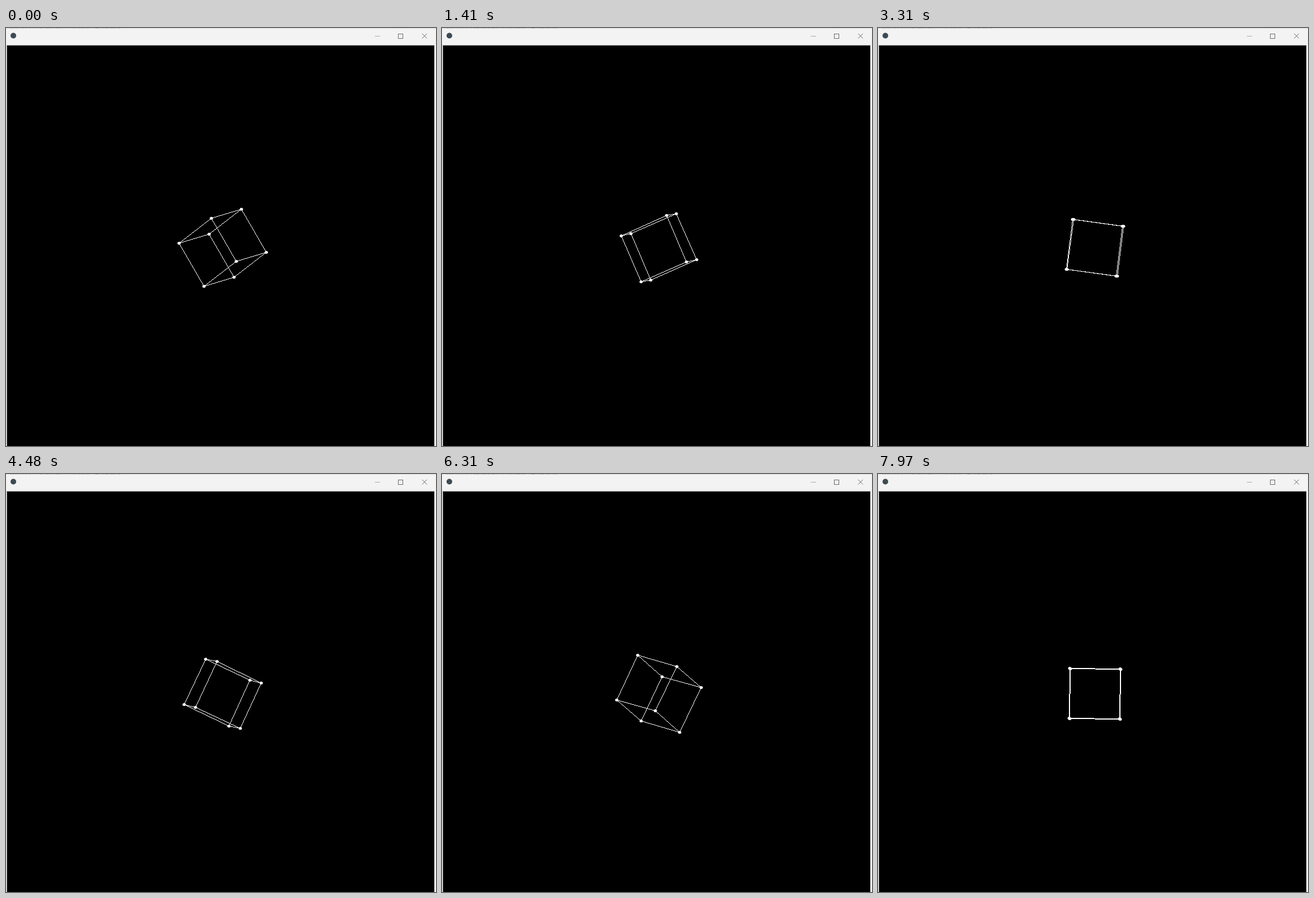
An HTML page with a canvas for the animation above (8000 ms loop, 759 px wide and 737 px high).

```html
<!DOCTYPE html>
<html lang="en">
<head>
<meta charset="utf-8">
<title>Rotating cube</title>
<style>
  html, body { margin: 0; width: 100%; height: 100%; overflow: hidden; background: #000; }
  canvas { display: block; }
</style>
</head>
<body>
<canvas id="stage" width="759" height="737"></canvas>
<script>
const W = 759, H = 737, LOOP = 8000;
const TICK = 68.1, PHASE = 0.52;   // repaint interval in ms, offset of the first repaint
const START = -39.4, SPEED = -0.01754;   // degrees, degrees per ms
const CENTER = { x: 382.3, y: 387 };
const HALF = { x: 44.6, y: 44.4 };
const ctx = document.getElementById('stage').getContext('2d');

// Steady turn with a slight drift in speed, held between repaints
function angleAt(t) {
  const held = Math.floor(t / TICK + PHASE) * TICK;
  const drift = 0.75 * Math.sin((held - 300) / LOOP * Math.PI * 2);
  return (START + SPEED * held + drift) * Math.PI / 180;
}

function rect(color, x, y, w, h) {
  ctx.fillStyle = color;
  ctx.fillRect(x, y, w, h);
}

// One-pixel line without smoothing
function pixelLine(a, b) {
  const dx = b.x - a.x, dy = b.y - a.y;
  const n = Math.max(Math.abs(dx), Math.abs(dy));
  for (let i = 0; i <= n; i++) {
    const k = n ? i / n : 0;
    ctx.fillRect(Math.round(a.x + dx * k), Math.round(a.y + dy * k), 1, 1);
  }
}

// Slivers of what lies behind the top edge
function drawBackdrop() {
  let seed = 7;
  const random = () => (seed = seed * 16807 % 2147483647) / 2147483647;
  rect('#d8d8d8', 0, 0, W, 1);
  for (let x = 8; x < 203; x += 2 + Math.floor(random() * 3)) {
    const g = 165 + Math.floor(random() * 50);
    rect(`rgb(${g},${g},${g})`, x, 0, 2, 1);
  }
}

function drawButtons() {
  ctx.lineWidth = 1;
  rect('#a8a8a8', 651, 14, 9, 1);
  ctx.strokeStyle = '#6a6a6a';
  ctx.strokeRect(692.5, 10.5, 8, 8);
  ctx.beginPath();
  for (const side of [-1, 1]) {
    ctx.moveTo(738.7 - 4.3 * side, 9.9);
    ctx.lineTo(738.7 + 4.3 * side, 18.5);
  }
  ctx.stroke();
}

function drawWindow() {
  rect('#f0f0f0', 0, 0, W, H);
  rect('#f3f3f3', 0, 1, W, 27);
  drawBackdrop();

  ctx.fillStyle = '#3d4a52';
  ctx.beginPath();
  ctx.arc(13, 13.5, 5, 0, Math.PI * 2);
  ctx.fill();

  drawButtons();
  rect('#a0a0a0', 1, 30, 755, H - 30);
  rect('#000', 2, 31, 754, H - 31);
}

// Turn about z, then y, then x by the same angle, and drop the depth
function project([x, y, z], angle) {
  const c = Math.cos(angle), s = Math.sin(angle);
  const px = c * c * x - c * s * y + s * z;
  const py = (c * s + s * s * c) * x + (c * c - s ** 3) * y - s * c * z;
  return {
    x: Math.round(CENTER.x + HALF.x * px),
    y: Math.round(CENTER.y + HALF.y * py)
  };
}

function drawCube(angle) {
  const sign = (i, bit) => i & bit ? 1 : -1;
  const points = Array.from({ length: 8 }, (_, i) =>
    project([sign(i, 1), sign(i, 2), sign(i, 4)], angle));

  ctx.fillStyle = '#fff';
  points.forEach((p, i) => {
    for (const bit of [1, 2, 4]) {
      if (!(i & bit)) pixelLine(p, points[i | bit]);
    }
    ctx.beginPath();
    ctx.ellipse(p.x + 0.5, p.y + 0.5, 2.9, 2.5, 0, 0, Math.PI * 2);
    ctx.fill();
  });
}

const start = performance.now();
function loop() {
  drawWindow();
  drawCube(angleAt((performance.now() - start) % LOOP));
  requestAnimationFrame(loop);
}
loop();
</script>
</body>
</html>
```
